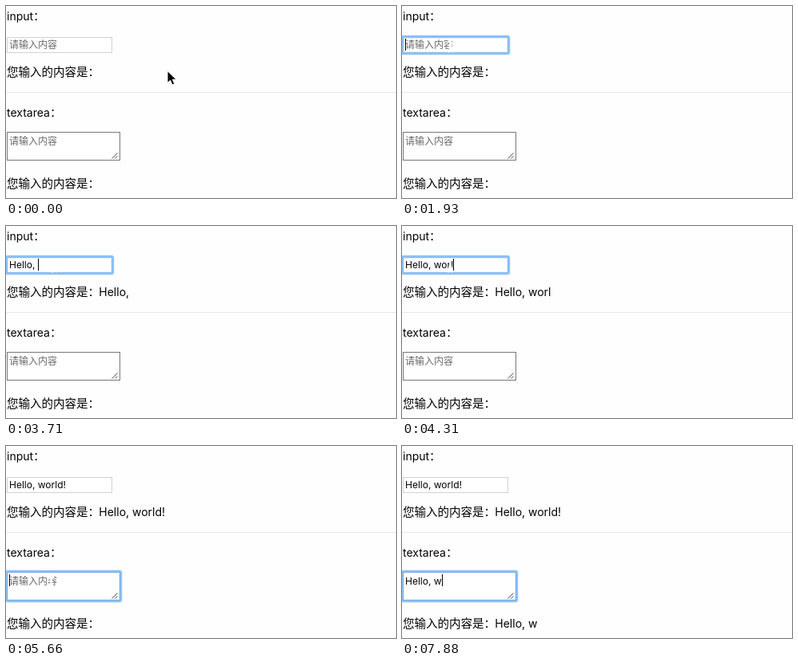
Write an HTML page that moves like this. It is 488 px wide and 241 px high and loops after 8000 ms.

```html
<!DOCTYPE html>
<html lang="zh-CN">
<head>
<meta charset="utf-8">
<style>
html, body { margin: 0; width: 100%; height: 100%; overflow: hidden; background: #fefefe; }
svg { display: block; }
text { white-space: pre; font: 14.5px "Noto Sans CJK SC", "Noto Sans CJK", sans-serif; }
.latin { font-family: Inter, sans-serif; font-size: 14px; }
.value { font-family: Inter, sans-serif; font-size: 12px; }
.hint { font-size: 12px; fill: #686868; }
.ring { fill: none; stroke: #7cb7f6; }
</style>
</head>
<body>
<svg width="488" height="241" viewBox="0 0 488 241">
  <text x="1" y="18"><tspan class="latin">input</tspan>：</text>
  <text x="1" y="139"><tspan class="latin">textarea</tspan>：</text>
  <path d="M0 108.5H488" stroke="#e6e6e6"/>
  <g id="fields"></g>
  <path d="M132.5 191.5l7-7M136.5 191.5l3-3" stroke="#555" fill="none"/>
  <path id="arrow" d="M0 0V15L3.6 11.8 6 17.4 8.8 16.2 6.4 10.8H11Z" stroke="#fff"/>
  <g id="beam" fill="none">
    <path id="stem" d="M-3.5-7.5Q0-7.5 0-5Q0-7.5 3.5-7.5M0-5V5M-3.5 7.5Q0 7.5 0 5Q0 7.5 3.5 7.5M-2 2.5H2" stroke="#fff" stroke-width="2.6"/>
    <use href="#stem" style="stroke: #111; stroke-width: 1.2"/>
  </g>
</svg>
<script>
const LOOP = 8000, BLINK = 450;
const PHRASE = 'Hello, world!';
const $ = id => document.getElementById(id);

function add(parent, tag, attrs, content = '') {
  const node = document.createElementNS('http://www.w3.org/2000/svg', tag);
  for (const key in attrs) node.setAttribute(key, attrs[key]);
  node.textContent = content;
  return parent.appendChild(node);
}

const show = (node, on) => node.setAttribute('visibility', on ? 'visible' : 'hidden');

function makeField({ y, width, height, border, baseline, caretY, outY, focus, blur, keys }) {
  const root = $('fields');
  add(root, 'rect', { x: 1.5, y: y + .5, width: width - 1, height: height - 1, fill: '#fff', stroke: border });
  const ring = add(root, 'g', {});
  const halo = { x: .5, y: y - .5, width: width + 1, height: height + 1, rx: 1.5, class: 'ring' };
  add(ring, 'rect', { ...halo, 'stroke-width': 4.4, opacity: .25 });
  add(ring, 'rect', { ...halo, 'stroke-width': 3, opacity: .8 });
  const hint = add(root, 'text', { x: 4, y: baseline, class: 'hint' }, '请输入内容');
  const value = add(root, 'text', { x: 4, y: baseline, class: 'value' });
  const caret = add(root, 'rect', { y: caretY, width: 1, height: 15 });
  add(root, 'text', { x: 1, y: outY }, '您输入的内容是：');
  const output = add(root, 'text', { x: 116.3, y: outY, class: 'latin' });

  return t => {
    // each key is [time, number of letters typed]
    const [since, count] = keys.filter(k => k[0] <= t).pop() || [focus, 0];
    const active = t >= focus && t < blur;
    value.textContent = output.textContent = PHRASE.slice(0, count);
    show(hint, !count);
    show(ring, active);
    const end = count ? value.getComputedTextLength() : 0;
    caret.setAttribute('x', Math.round(4 + end));
    show(caret, active && Math.floor((t - since) / BLINK) % 2 === 0);
  };
}

const fields = [
  makeField({
    y: 39, width: 132, height: 20, border: '#d2d2d2', baseline: 53, caretY: 41, outY: 88,
    focus: 1030, blur: 5660,
    keys: [2230, 2520, 2820, 2970, 3120, 3410, 3710, 3860, 4010, 4160, 4310, 4460, 4910].map((at, i) => [at, i + 1])
  }),
  makeField({
    y: 158, width: 142, height: 36, border: '#777', baseline: 173.5, caretY: 161, outY: 228,
    focus: 5660, blur: LOOP,
    keys: [[6250, 1], [6550, 2], [6840, 3], [7140, 4], [7430, 5], [7730, 6], [7880, 8]]
  })
];

// pointer stops: time, x, y, text cursor
const stops = [
  [0, 202, 81.5, false], [300, 165, 76, false], [450, 104, 62, false], [580, 68, 52, true], [730, 60.5, 49.5, true],
  [5060, 60, 72, true], [5210, 58, 118, false], [5360, 57, 160, true], [5510, 56.5, 172, true]
];

function draw(t) {
  fields.forEach(update => update(t));
  const [, x, y, overText] = stops.filter(s => s[0] <= t).pop();
  for (const id of ['arrow', 'beam']) {
    $(id).setAttribute('transform', `translate(${x} ${y})`);
    show($(id), overText === (id === 'beam'));
  }
}

function tick() {
  draw(performance.now() % LOOP);
  requestAnimationFrame(tick);
}
tick();
</script>
</body>
</html>
```
